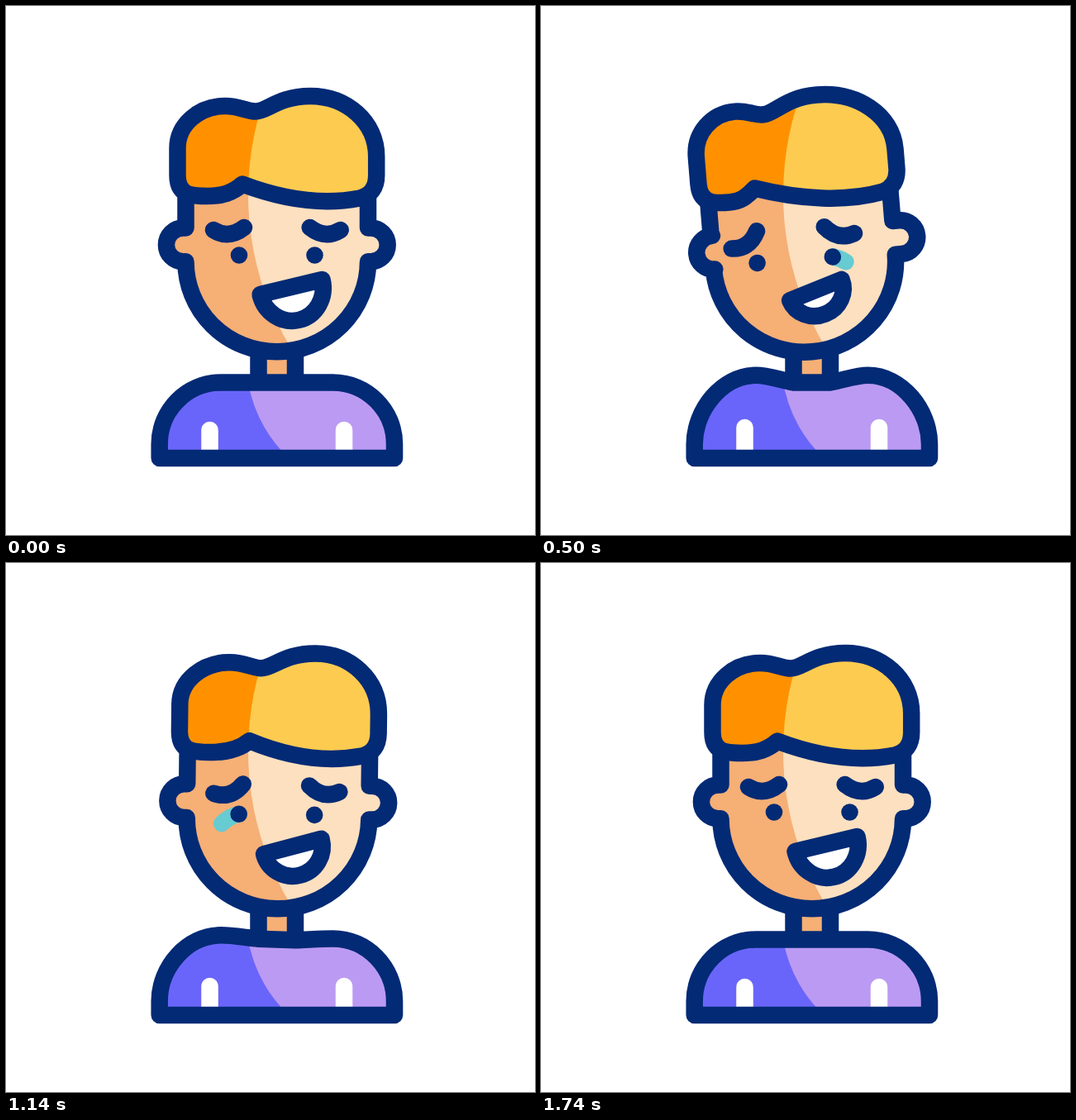
These frames come from a looping animation (640x640 px, 1900 ms). An HTML page:

```html
<!DOCTYPE html>
<html lang="en">
<head>
<meta charset="utf-8">
<title>Laughing man</title>
<style>
  html, body { margin: 0; width: 100%; height: 100%; overflow: hidden; background: #fff; }
  svg { display: block; width: 100vw; height: 100vh; }
  .line { fill: none; stroke: #032a75; stroke-width: 20.5; stroke-linecap: round; stroke-linejoin: round; }
  .tear { fill: none; stroke: #67cbd2; stroke-width: 20; stroke-linecap: round; }
  .shine { stroke: #fff; stroke-width: 20.5; stroke-linecap: round; }
</style>
</head>
<body>
<svg viewBox="0 0 640 640">
  <defs>
    <path id="shirt"/>
    <path id="head"/>
    <path id="hair"/>
    <clipPath id="inShirt"><use href="#shirt"/></clipPath>
    <clipPath id="inHead"><use href="#head"/></clipPath>
    <clipPath id="inHair"><use href="#hair"/></clipPath>
  </defs>

  <path d="M305.5 405H350V456H305.5Z" fill="#f6af75"/>
  <path class="line" d="M305.5 412V456M350 412V456"/>

  <use href="#shirt" fill="#6a65fa"/>
  <path d="M290 435Q296 503 342 547H500V435Z" fill="#bb9af3" clip-path="url(#inShirt)"/>
  <path id="shine" class="shine" d="M246.5 513V545M409 513V545"/>
  <use href="#shirt" class="line"/>

  <use href="#head" fill="#f6af75"/>
  <circle cx="653" cy="228" r="360" fill="#fde0bf" clip-path="url(#inHead)"/>
  <use href="#head" class="line"/>

  <g id="face">
    <path id="tearL" class="tear" pathLength="1" d="M282 301.5q-24 6-38 38"/>
    <path id="tearR" class="tear" pathLength="1" d="M373.5 301.5q24 6 38 38"/>
    <circle cx="282" cy="301.5" r="10.3" fill="#032a75"/>
    <circle cx="373.5" cy="301.5" r="10.3" fill="#032a75"/>
    <path id="browL" class="line" d="M-18.5 1.5Q0 13 18.5-1.5"/>
    <path id="browR" class="line" d="M-18.5-1.5Q0 13 18.5 1.5"/>
    <path id="mouth" class="line" style="fill:#fff"/>
  </g>

  <use href="#hair" fill="#ff9100"/>
  <circle cx="653" cy="228" r="360" fill="#fdcb50" clip-path="url(#inHair)"/>
  <use href="#hair" class="line"/>
</svg>
<script>
const LOOP = 1900;
const $ = id => document.getElementById(id);
const set = (id, name, value) => $(id).setAttribute(name, value);
const clamp = v => Math.min(1, Math.max(0, v));
const mix = (a, b, k) => a + (b - a) * k;
const span = (t, from, to) => clamp((t - from) / (to - from));
const smooth = k => k * k * (3 - 2 * k);

// Cubic bezier easing with control points (x1, 0) and (x2, 1)
function ease(x, x1, x2) {
  let lo = 0, hi = 1;
  for (let i = 0; i < 24; i++) {
    const s = (lo + hi) / 2, r = 1 - s;
    if (3 * r * r * s * x1 + 3 * r * s * s * x2 + s ** 3 < x) lo = s; else hi = s;
  }
  return lo * lo * (3 - 2 * lo);
}

// Weights of the two leaning poses: rest -> left -> right -> rest
function weights(t) {
  if (t < 820) return [ease(t / 820, 0.17, 0.1), 0];
  const swing = smooth(span(t, 820, 1340));
  return [1 - swing, swing * (1 - smooth(span(t, 1340, 1740)))];
}

function shirtPath(l, r, ml, mr) {
  return `M185.7 547V530C185.7 489 219 ${l} 260 ${l}` +
    `C275 ${l} 290 ${mix(l, ml, 0.67)} 305.5 ${ml}L350 ${mr}` +
    `C366 ${mix(r, mr, 0.67)} 381 ${r} 395.5 ${r}C436.5 ${r} 470 489 470 530V547Z`;
}

function headPath(ear) {
  return `M217.5 195V268.5H${214.3 + ear}a20.4 20.4 0 0 0 0 40.8L217.5 309.3` +
    `A110.2 109 0 0 0 438 309.3L${441.3 + ear} 309.3a20.4 20.4 0 0 0 0-40.8H438V195Z`;
}

function hairPath(dip, tip) {
  return `M207.5 172C207.5 143 ${234 + 0.4 * dip} 121 ${265 + 0.7 * dip} 121` +
    `C${283 + dip} 121 ${291 + dip} 127.5 ${302 + dip} 127.5` +
    `C${316 + dip} 127.5 ${330 + dip} 109 ${368 + dip} 109` +
    `C${412 + 0.5 * dip} 109 448.2 140 448.2 182V205C448.2 220 441 229.5 428 232.5` +
    `C385 241 ${335 + 0.5 * tip} 234 ${286 + tip} 215.5` +
    `C${274 + tip} 226 ${262 + 0.5 * tip} 230 243 230` +
    `C235 230 228 229.5 222 228C212 225 207.5 217 207.5 205Z`;
}

function mouthPath(grin) {
  const x1 = 307.5 + 11 * grin, y1 = 349 + 0.9 * grin;
  const x2 = 382.5 - 0.5 * grin, y2 = 331 - 1.4 * grin;
  const half = Math.hypot(x2 - x1, y2 - y1) / 2;
  const angle = Math.atan2(y2 - y1, x2 - x1) * 180 / Math.PI;
  return `M${x1} ${y1}L${x2} ${y2}A${half} ${41 - 10.5 * grin} ${angle} 0 1 ${x1} ${y1}Z`;
}

function drawTear(id, t, start) {
  const p = (t - start) / 300;
  const end = clamp(p / 0.55), tail = clamp((p - 0.45) / 0.55);
  const style = $(id).style;
  style.display = p > 0 && p < 1 ? "" : "none";
  style.strokeDasharray = `${Math.max(0.001, end - tail)} 3`;
  style.strokeDashoffset = -tail;
  style.strokeWidth = 20 * clamp((1 - p) / 0.25);
}

function render(t) {
  const [a, b] = weights(t);
  const tilt = -5.1 * a + 3.45 * b;
  const grin = a + 0.24 * b;
  const turn = `rotate(${tilt} 327.8 418)`;

  set("shirt", "d", shirtPath(455.5 - 9.5 * a - 3 * b, 455.5 - 9.5 * a + 3 * b, 455.5 - b, 455.5 + b));
  set("shine", "transform", `translate(0 ${-3.3 * a})`);

  set("head", "d", headPath(4.9 * a - 2.4 * b));
  set("head", "transform", turn);
  set("hair", "d", hairPath(10 * (b - a), 15 * b - 12 * a));
  set("hair", "transform", turn);

  set("face", "transform", `translate(${-12 * a + 3.4 * b} ${5.8 * grin}) ${turn}`);
  set("browL", "transform", `translate(${269.5 - grin} ${269.5 + 3 * grin}) rotate(${-28 * grin})`);
  set("browR", "transform", `translate(${386.2 - 2.2 * grin} ${269.5 + 0.4 * grin}) rotate(${13.4 * grin})`);
  set("mouth", "d", mouthPath(grin));
  drawTear("tearR", t, 450);
  drawTear("tearL", t, 1070);
}

const begin = performance.now();
function tick() {
  render((performance.now() - begin) % LOOP);
  requestAnimationFrame(tick);
}
tick();
</script>
</body>
</html>
```
